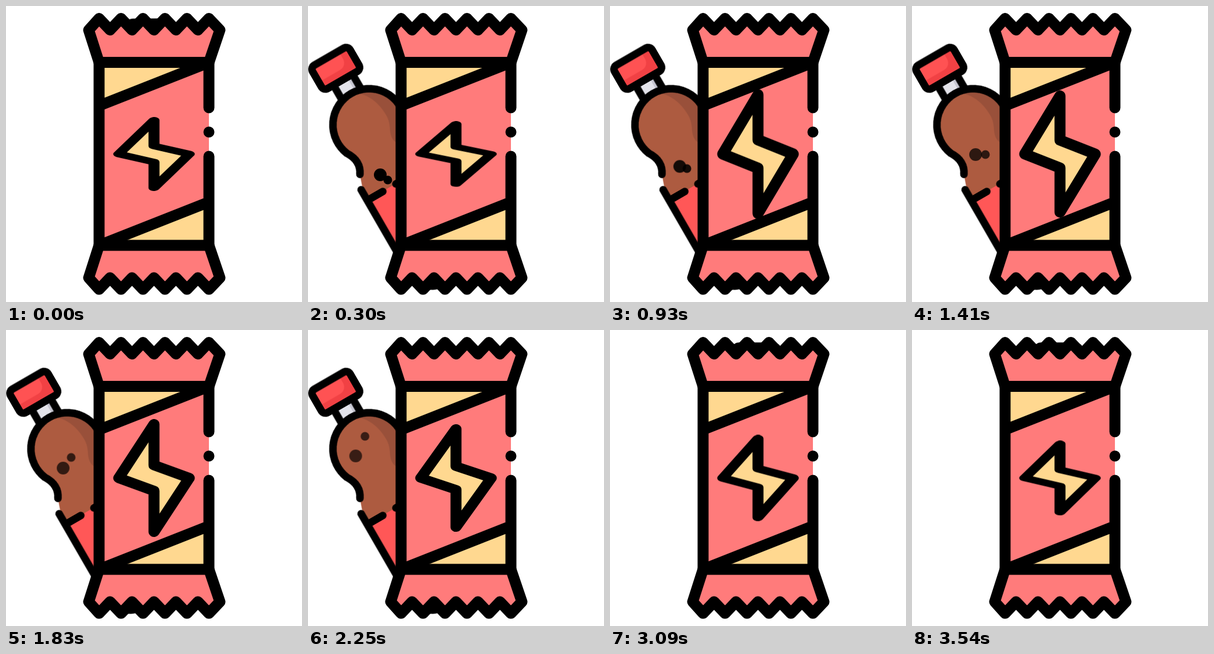
An HTML page for the animation above (3.57 s loop, 512 px wide and 512 px high).

```html
<!DOCTYPE html>
<html lang="en">
<head>
<meta charset="utf-8">
<title>Energy bar</title>
<style>
  html, body { margin: 0; width: 100%; height: 100%; overflow: hidden; background: #fff; }
  svg { display: block; width: 100vw; height: 100vh; }
  .line { fill: none; stroke: #000; stroke-linecap: round; stroke-linejoin: round; }
  .thin { stroke-width: 13; }
  .bold { stroke-width: 19; }
  .bottle, .bolt, .bubble { animation: 3570ms linear infinite; }
  .bottle { transform-origin: 256px 462px; animation-name: swing; }
  .bolt { transform-origin: 256px 256px; animation-name: stretch; }
  .big { animation-name: rise-big; }
  .small { animation-name: rise-small; }

  @keyframes swing {
    0% { transform: rotate(0deg); animation-timing-function: cubic-bezier(.22, 1, .36, 1); }
    8%, 77.3% { transform: rotate(-30deg); animation-timing-function: ease-in-out; }
    85.6%, 100% { transform: rotate(0deg); }
  }
  @keyframes stretch {
    0% { transform: scaleY(.582); }
    15.1% { transform: scaleY(.464); }
    16.5% { transform: scaleY(.454); animation-timing-function: cubic-bezier(.4, 0, .4, 1); }
    28% { transform: scaleY(1.038); animation-timing-function: cubic-bezier(.33, 0, .67, .33); }
    39.5% { transform: scaleY(1); }
    45.4% { transform: scaleY(.967); }
    60.5% { transform: scaleY(.864); }
    100% { transform: scaleY(.582); }
  }
  @keyframes rise-big {
    0%, 15.1% { transform: translate(125px, 292px); opacity: 1; }
    30.2% { transform: translate(119px, 272px); }
    39.5% { transform: translate(110px, 257px); opacity: .74; }
    45.4% { transform: translate(107px, 249px); }
    60.5% { transform: translate(86px, 223px); }
    63% { transform: translate(82.5px, 218px); opacity: .68; }
    77.3% { transform: translate(73px, 168px); opacity: .15; }
    80%, 100% { transform: translate(72px, 158px); opacity: 0; }
  }
  @keyframes rise-small {
    0%, 15.1% { transform: translate(138px, 301px); opacity: 1; }
    39.5% { transform: translate(127px, 257px); opacity: .74; }
    63% { transform: translate(98.5px, 184px); opacity: .68; }
    75.6%, 100% { transform: translate(99px, 156px); opacity: 0; }
  }
</style>
</head>
<body>
<svg viewBox="0 0 512 512">
  <!-- bottle, drawn upright -->
  <g class="bottle">
    <path fill="#e3e3ea" d="M235 72h38v36h-38z"/>
    <path fill="#c7c7d2" d="M262 72h11v36h-11z"/>
    <path fill="#ad5b40" d="M254 101C219 101 191.500 129 191.500 163.500C191.500 186 204 194 204 209C204 220 198 228 196 235L188 258V280H322V255L311 231C302 216 304 202 312 188C316 180 316.500 171 316.500 163.500C316.500 129 289 101 254 101Z"/>
    <path fill="#99503a" d="M250 101C274 108 288 134 288 164C288 186 277 190 277 207C278 220 296 226 296 255V280H322V255L311 231C302 216 304 202 312 188C316 180 316.500 171 316.500 163.500C316.500 129 289 101 254 101Z"/>
    <path fill="#ff5757" d="M186 276H322V422A44 44 0 0 1 278 466H230A44 44 0 0 1 186 422Z"/>
    <rect x="215.500" y="28" width="75" height="46.500" rx="8" fill="#ff5253"/>
    <path fill="#f14144" d="M272 28h11a8 8 0 0 1 8 8v30.500a8 8 0 0 1-8 8h-68v-17h43a14 14 0 0 0 14-14z"/>
    <g class="line thin">
      <path d="M235 75V103M273 75V103"/>
      <rect x="215.500" y="28" width="75" height="46.500" rx="8"/>
      <path d="M197.500 231C207 217 205 202 196 188A62.500 62.500 0 1 1 312 188C303 202 301 217 310.500 231"/>
      <path d="M186 255V422A44 44 0 0 0 230 466H278A44 44 0 0 0 322 422V255M188 276.500H217M243 276.500H322"/>
    </g>
    <g transform="rotate(30 256 462)">
      <circle class="bubble big" r="11"/>
      <circle class="bubble small" r="7.500"/>
    </g>
  </g>

  <!-- wrapper -->
  <path fill="#ff7b7b" d="M161 97.600h190V414H161z"/>
  <path fill="#ffd890" d="M161 97.600H351L161 172.500zM161 414H351V339z"/>
  <path id="crimp" class="line bold" style="fill:#ff7b7b" d="M161 97.600L143 41.500L161 21.500L180 41.500L199 21.500L218 41.500L237 21.500L256 41.500L275 21.500L294 41.500L313 21.500L332 41.500L351 21.500L370 41.500L351 97.600Z"/>
  <use href="#crimp" transform="matrix(1 0 0 -1 0 511.600)"/>
  <path class="line bold" d="M161 97.600V414M351 97.600V176M351 218h.01M351 260V414M161 172.500L351 97.600M161 414L351 339"/>
  <path class="line bold bolt" style="fill:#ffd890" d="M256 155.500V232L317 256L256 356.500V280L195 256Z"/>
</svg>
</body>
</html>
```
